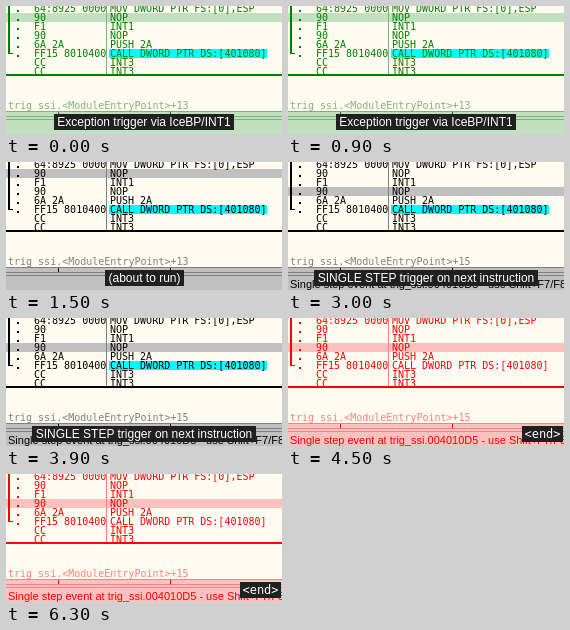
An HTML page for the animation above (7.5 s loop, 276 px wide and 128 px high).

```html
<!DOCTYPE html>
<html lang="en">
<head>
<meta charset="utf-8">
<title>Debugger single step</title>
<style>
  html, body { margin: 0; width: 100%; height: 100%; overflow: hidden; background: #fff; }
  svg { display: block; width: 276px; height: 128px; }
  text { white-space: pre; }
  .mono { font: 10px "DejaVu Sans Mono", "Liberation Mono", monospace; }
  .sans { font: 11px "Liberation Sans", Arial, sans-serif; }
  .label { font: 12px "Liberation Sans", Arial, sans-serif; fill: #fff; }
  .code { font: 12px "DejaVu Sans Mono", monospace; fill: #fff; }
</style>
</head>
<body>
<svg id="stage" viewBox="0 0 276 128"></svg>
<script>
const LOOP = 7500;
const ROW_TOP = -2, ROW_H = 9;
const DIVIDER = 100, PANE_END = 68;

const rows = [
  ["64:8925 00000000", "MOV DWORD PTR FS:[0],ESP"],
  ["90", "NOP"],
  ["F1", "INT1"],
  ["90", "NOP"],
  ["6A 2A", "PUSH 2A"],
  ["FF15 80104000", "CALL DWORD PTR DS:[401080]"],
  ["CC", "INT3"],
  ["CC", "INT3"]
];
const CALL_ROW = 5;

const plain = { ink: "#000", dim: "#808080", bar: "#c0c0c0", edge: "#808080", call: "#00ffff" };
const green = { ink: "#008000", dim: "#80b080", bar: "#c0e0c0", edge: "#80b080", call: "#00ffff" };
const red = { ink: "#ff0000", dim: "#ff8080", bar: "#ffc0c0", edge: "#ff8080", call: "#ffffff" };
const PAPER = "#fffbf0";

const scenes = [
  { at: 0, look: green, row: 1, offset: 13, label: "Exception trigger via IceBP/INT1", box: [48, 180] },
  { at: 1500, look: plain, row: 1, offset: 13, label: "(about to run)", box: [99, 79] },
  { at: 3000, look: plain, row: 3, offset: 15, label: "SINGLE STEP trigger on next instruction", box: [26, 224], status: true },
  { at: 4500, look: red, row: 3, offset: 15, label: "<end>", box: [234, 41], font: "code", status: true }
];

const esc = s => s.replace(/&/g, "&amp;").replace(/</g, "&lt;");
const rect = (x, y, w, h, fill) =>
  `<rect x="${x}" y="${y}" width="${w}" height="${h}" fill="${fill}"/>`;
const text = (x, y, s, cls, fill, extra = "") =>
  `<text x="${x}" y="${y}" class="${cls}" fill="${fill}" ${extra}>${esc(s)}</text>`;

function listing({ look, row }) {
  const rowY = i => ROW_TOP + i * ROW_H;
  let out = rect(0, rowY(row), 276, ROW_H, look.bar);
  out += rect(103, rowY(CALL_ROW), 158, ROW_H, look.call);
  rows.forEach(([hex, op], i) => {
    const y = rowY(i) + 8;
    if (i <= CALL_ROW) out += rect(11, y - 2, 2, 2, look.ink);
    out += text(28, y, hex, "mono", look.ink, 'clip-path="url(#hex)"');
    out += text(104, y, op, "mono", look.ink);
  });
  out += rect(DIVIDER, 0, 1, PANE_END, look.edge);
  // procedure bracket
  return out + rect(2, 0, 2, 48, look.ink) + rect(2, 47, 5, 1, look.ink);
}

function footer({ look, offset, status }) {
  let out = rect(0, PANE_END, 276, 60, PAPER) + rect(0, PANE_END, 276, 2, look.ink);
  out += text(2, 103, `trig_ssi.<ModuleEntryPoint>+${offset}`, "mono", look.dim);
  out += rect(0, 105, 276, 23, look.bar);
  out += [105, 110, 113].map(y => rect(0, y, 276, 1, look.edge)).join("");
  out += [52, 164].map(x => rect(x, 106, 1, 4, look.ink)).join("");
  if (status)
    out += text(2, 126, "Single step event at trig_ssi.004010D5 - use Shift+F7/F8/F9", "sans", look.ink);
  return out;
}

function draw(scene) {
  const [x, w] = scene.box;
  return rect(0, 0, 276, 128, PAPER) + listing(scene) + footer(scene) +
    rect(x, 108, w, 16, "#202020") +
    text(x + w / 2, 120, scene.label, scene.font || "label", "#fff", 'text-anchor="middle"');
}

const stage = document.getElementById("stage");
stage.innerHTML = `<clipPath id="hex">${rect(0, 0, DIVIDER, 128, "#000")}</clipPath>` +
  scenes.map(s => `<g>${draw(s)}</g>`).join("");
const layers = [...stage.querySelectorAll("g")];
const start = performance.now();

function tick() {
  const t = (performance.now() - start) % LOOP;
  const now = scenes.filter(s => s.at <= t).length - 1;
  layers.forEach((g, i) => g.style.display = i === now ? "" : "none");
  requestAnimationFrame(tick);
}
tick();
</script>
</body>
</html>
```
